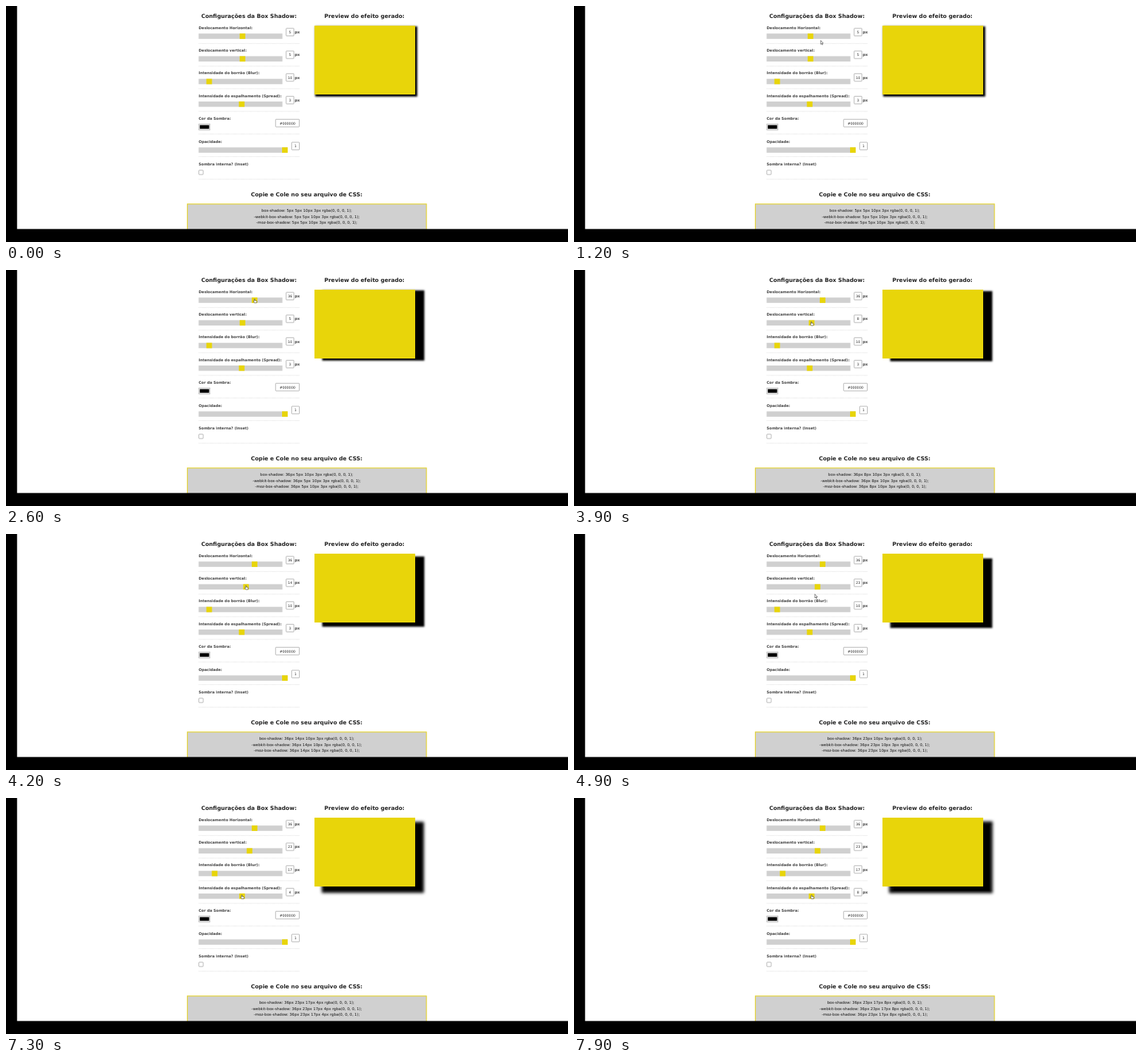
Write an HTML page that moves like this. It is 798 by 336 pixels and loops after 8000 ms.

```html
<!DOCTYPE html>
<html lang="pt-BR">
<head>
<meta charset="utf-8">
<title>Box Shadow</title>
<style>
  html, body { margin: 0; width: 100%; height: 100%; overflow: hidden; background: #fff; }
  svg { position: absolute; left: 0; top: 0; }
  text { font-family: "DejaVu Sans", Verdana, sans-serif; text-rendering: geometricPrecision; }
  .title { font-size: 7.8px; font-weight: bold; fill: #222; text-anchor: middle; }
  .label { font-size: 5.26px; font-weight: bold; fill: #444; }
  .value { font-size: 4.8px; fill: #222; text-anchor: middle; }
  .code { font-size: 5.4px; fill: #111; text-anchor: middle; }
  .track { fill: #d0d0d0; }
  .thumb { fill: #e8d50a; }
  .field { fill: #fff; stroke: #999; stroke-width: .7; }
  .rule { stroke: #d2d2d2; stroke-width: .6; stroke-dasharray: .7 .4; }
  .cursor { fill: #fff; stroke: #333; stroke-width: .6; stroke-linejoin: round; }
  #preview { position: absolute; left: 437.8px; top: 27.5px; width: 143.2px; height: 98.5px; background: #e8d50a; }
</style>
</head>
<body>
<div id="preview"></div>
<svg width="798" height="336" viewBox="0 0 798 336">
  <text class="title" x="345" y="17.3">Configurações da Box Shadow:</text>
  <text class="title" x="509" y="17.3">Preview do efeito gerado:</text>
  <text class="title" x="427" y="271.2">Copie e Cole no seu arquivo de CSS:</text>

  <g id="form"></g>
  <rect x="273.8" y="168" width="15.9" height="8.4" fill="#eee" stroke="#aaa" stroke-width=".7"/>
  <rect x="275.2" y="169.6" width="13.2" height="5.2"/>
  <rect class="field" x="273.8" y="233.8" width="6.2" height="6.2" rx=".8"/>

  <rect x="257.5" y="281.9" width="339.5" height="50" fill="#d0d0d0" stroke="#e4d332" stroke-width="1.2"/>
  <text class="code" x="427" y="292.6"></text>
  <text class="code" x="427" y="301.5"></text>
  <text class="code" x="427" y="310.4"></text>

  <path d="M0 0H15.7V317.4H798V336H0Z"/>
  <path id="arrow" class="cursor" d="M0 0V5.4L1.2 4.3L2 6.2L2.9 5.8L2.1 4H3.7Z"/>
  <path id="hand" class="cursor" d="M-.6 .2Q0 -.5 .6 .2V2L2.6 2.5Q3.3 2.7 3.2 3.4L2.7 5.4H-.3L-1.6 3.4Q-1.5 2.6 -.6 3.1Z"/>
</svg>
<script>
const LOOP = 8000, STEP = 100;
const SCALE = 0.325, BLUR_SCALE = 0.25;
const $ = id => document.getElementById(id);
const form = $("form");

function add(tag, attrs, text = "") {
  const el = document.createElementNS("http://www.w3.org/2000/svg", tag);
  for (const name in attrs) el.setAttribute(name, attrs[name]);
  el.textContent = text;
  return form.appendChild(el);
}
const label = (x, y, text) => add("text", { class: "label", x, y }, text);

function field(x, y, width, text = "") {
  add("rect", { class: "field", x, y, width, height: 10.8, rx: .6 });
  return add("text", { class: "value", x: x + width / 2, y: y + 7.2 }, text);
}

function slider(y, width) {
  add("rect", { class: "track", x: 273.5, y, width, height: 7.6 });
  return add("rect", { class: "thumb", x: 392, y: y - .1, width: 8, height: 7.8 });
}

// Thumb centre for ranges -100..100 and 0..100
const signedX = v => 333 + .555 * v;
const blurX = v => 277.4 + 1.11 * v;

// Each slider is dragged once, in order
const rows = [
  { name: "Deslocamento Horizontal:", toX: signedX, from: 5, to: 36, start: 2100, end: 2600 },
  { name: "Deslocamento vertical:", toX: signedX, from: 5, to: 23, start: 3800, end: 4600 },
  { name: "Intensidade do borrão (Blur):", toX: blurX, from: 10, to: 17, start: 5700, end: 6100 },
  { name: "Intensidade do espalhamento (Spread):", toX: signedX, from: 3, to: 8, start: 7250, end: 7900 }
];
rows.forEach((row, i) => {
  row.y = 39.2 + 32.25 * i;
  label(273.5, row.y - 6.4, row.name);
  label(410, row.y, "px");
  row.thumb = slider(row.y, 119);
  row.field = field(397.8, row.y - 7.4, 11);
});
label(273.5, 161.8, "Cor da Sombra:");
field(382.8, 161.3, 33.6, "#000000");
label(273.5, 194.9, "Opacidade:");
slider(201.3, 126.5);
field(405.7, 194, 10.8, "1");
label(273.5, 227.3, "Sombra interna? (Inset)");
for (let i = 0; i < 7; i++) {
  const y = 53.4 + 32.2 * i;
  add("line", { class: "rule", x1: 273.5, x2: 417, y1: y, y2: y });
}

const progress = (t, start, end) => Math.min(1, Math.max(0, (t - start) / (end - start)));
const mix = (a, b, p) => a + (b - a) * p;
const bezier = (a, b, c, d, p) =>
  mix(mix(mix(a, b, p), mix(b, c, p), p), mix(mix(b, c, p), mix(c, d, p), p), p);

const valueAt = (row, t) => mix(row.from, row.to, progress(t, row.start, row.end));
const grip = (row, t) => [row.toX(valueAt(row, t)), row.y + 2.2];

const ENTER = 200, ARRIVE = 1200, LEAD = 900, TRAVEL = 700;

function cursorAt(t) {
  if (t <= ARRIVE) {
    const p = progress(t, ENTER, ARRIVE);
    return [bezier(117, 200, 420, 350.3, p), bezier(262, 330, 110, 49, p)];
  }
  // Drop towards the next slider first, then slide across to its thumb
  let [x, y] = cursorAt(ARRIVE);
  for (const row of rows) {
    const p = progress(t, row.start - LEAD, row.start - LEAD + TRAVEL);
    if (p === 0) break;
    const [gx, gy] = grip(row, t);
    x = mix(x, gx, p ** 1.4);
    y = mix(y, gy, 1 - (1 - p) ** 3);
  }
  return [x, y];
}

const codeLines = document.querySelectorAll(".code");
const prefixes = ["", "-webkit-", "-moz-"];

function draw(t) {
  const values = rows.map(row => Math.ceil(valueAt(row, t)));
  const [x, y] = cursorAt(t);
  let over = false;

  rows.forEach((row, i) => {
    const cx = row.toX(values[i]);
    row.thumb.setAttribute("x", cx - 4);
    row.field.textContent = values[i];
    over = over || (Math.abs(x - cx) < 4.5 && y >= row.y && y <= row.y + 7.6);
  });

  const css = values.map(v => v + "px").join(" ");
  codeLines.forEach((line, i) => {
    line.textContent = `${prefixes[i]}box-shadow: ${css} rgba(0, 0, 0, 1);`;
  });
  const [dx, dy, blur, spread] = values;
  $("preview").style.boxShadow =
    `${dx * SCALE}px ${dy * SCALE}px ${blur * BLUR_SCALE}px ${spread * SCALE}px #000`;

  for (const [id, on] of [["arrow", !over], ["hand", over]]) {
    $(id).setAttribute("transform", `translate(${x} ${y})`);
    $(id).style.display = t > ENTER && on ? "" : "none";
  }
}

const origin = performance.now();
function tick() {
  const t = (performance.now() - origin) % LOOP;
  draw(Math.floor(t / STEP) * STEP);
  requestAnimationFrame(tick);
}
tick();
</script>
</body>
</html>
```
